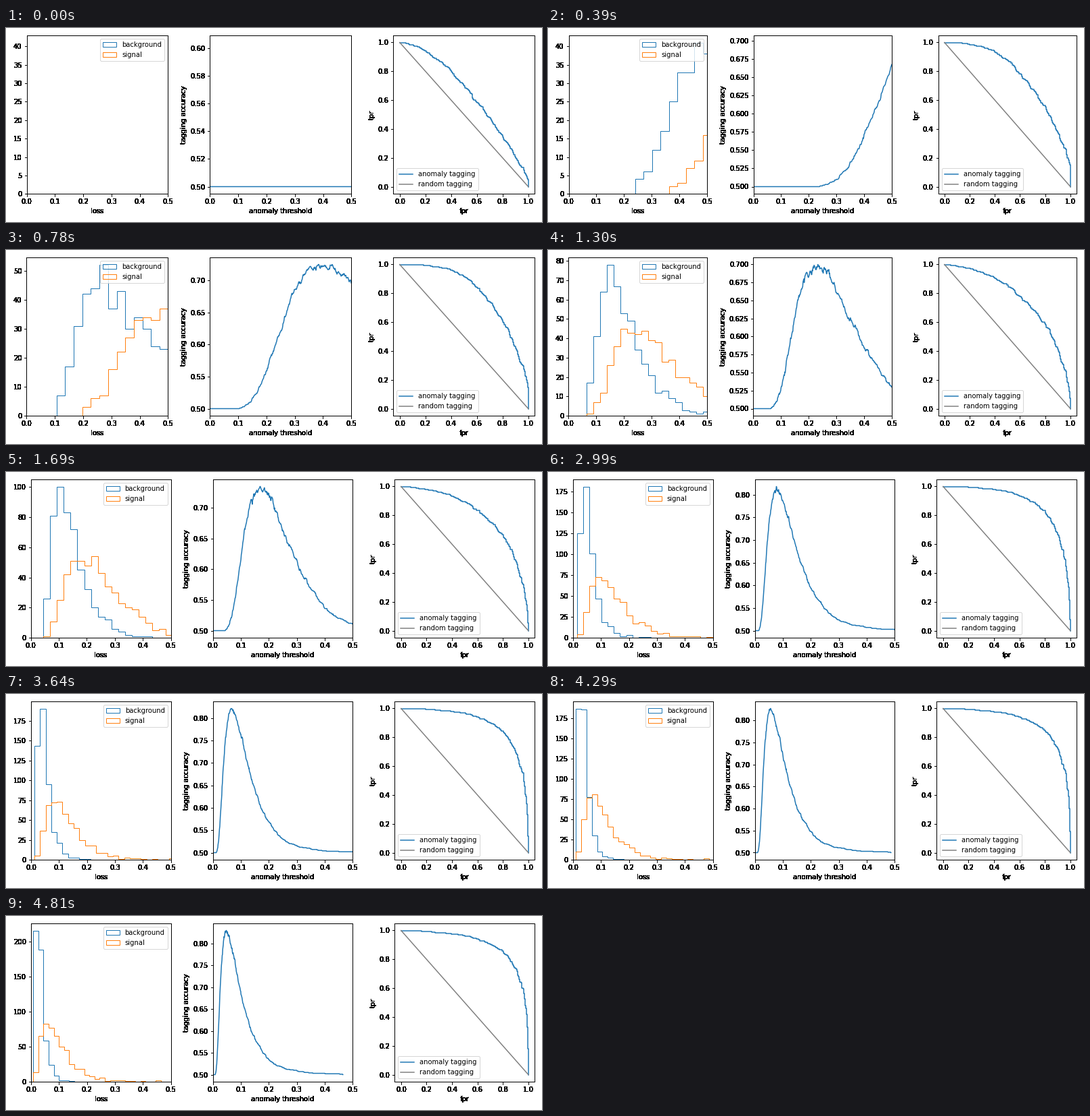
A matplotlib script that plays this animation: 792x288 px, repeating every 4940 ms.

```python
import numpy as np
import matplotlib.pyplot as plt
from matplotlib.animation import FuncAnimation
from matplotlib.axes import Axes

W, H, DPI = 792, 288, 72
STEPS, INTERVAL = 38, 130
BINS, SAMPLES = 25, 500

# Key points of training: median loss and its log-normal spread.
KEYS = [0, 6, 10, 17, 23, 28, 37]
BG_MEDIAN = [.9, .331, .181, .081, .0495, .042, .029]
SIG_MEDIAN = [.965, .53, .283, .162, .1275, .111, .084]
BG_SPREAD = [.15, .46, .42, .43, .51, .49, .49]
SIG_SPREAD = [.123, .33, .41, .46, .52, .53, .59]

rng = np.random.default_rng(4)


class InkAxes(Axes):
    """Axes whose outside parts are inked several times."""

    def draw(self, renderer):
        super().draw(renderer)
        lines, texts = list(self.spines.values()), []
        for axis in (self.xaxis, self.yaxis):
            lo, hi = sorted(axis.get_view_interval())
            eps = 1e-6 * (hi - lo)
            ticks = [t for t in axis.get_major_ticks()
                     if lo - eps <= t.get_loc() <= hi + eps]
            lines += [t.tick1line for t in ticks]
            texts += [t.label1 for t in ticks] + [axis.label]
        for artist in lines * 4 + texts * 24:
            artist.draw(renderer)


def normal_scores():
    """Stratified normal deviates, a little jittered."""
    blocks = np.sort(rng.normal(size=SAMPLES * 40)).reshape(SAMPLES, 40)
    z = blocks.mean(axis=1) + rng.normal(0, .05, SAMPLES)
    return np.sort(np.clip(z * 1.01, -2.9, 2.9))


bg_z, sig_z = normal_scores(), normal_scores()


def losses(step):
    """Sorted background and signal losses after some training."""
    def key(values):
        return np.interp(step, KEYS, values)

    def sample(z, median, spread, skew=0):
        # Early in training the upper tail is squeezed.
        squeeze = .113 * np.exp(-max(step - 6, 0) / 4)
        z = (z + skew * z ** 2) / (1 + squeeze * np.maximum(z, 0) ** 2)
        return np.sort(np.exp(key(np.log(median)) + key(spread) * z))

    skew = .05 * min(step / 6, 1)
    return (sample(bg_z, BG_MEDIAN, BG_SPREAD, skew),
            sample(sig_z, SIG_MEDIAN, SIG_SPREAD))


def below(values, cuts):
    return np.searchsorted(values, cuts, side="right") / len(values)


fig = plt.figure(figsize=(W / DPI, H / DPI), dpi=DPI)
axes = [fig.add_subplot(1, 3, i + 1, axes_class=InkAxes) for i in range(3)]


def update(step):
    bg, sig = losses(step)
    both = np.sort(np.concatenate([bg, sig]))
    hist, acc, roc = axes
    for ax in axes:
        ax.clear()

    edges = np.linspace(both[0], both[-1], BINS + 1)
    hist.hist(bg, edges, histtype="step", label="background")
    hist.hist(sig, edges, histtype="step", label="signal")
    hist.set(xlim=(0, .5), xlabel="loss")
    hist.legend(loc="upper right")

    cuts = np.linspace(0, both[-1], 500)
    acc.plot(cuts, .5 + (below(bg, cuts) - below(sig, cuts)) / 2)
    acc.set(xlim=(0, .5), xlabel="anomaly threshold", ylabel="tagging accuracy")

    cuts = np.append(0, both)
    roc.plot(below(bg, cuts), 1 - below(sig, cuts), label="anomaly tagging")
    roc.plot([0, 1], [1, 0], color="gray", label="random tagging")
    roc.set(xlabel="fpr", ylabel="tpr")
    roc.legend(loc="lower left")

    # Start every layout from the same margins.
    fig.subplots_adjust(left=.125, right=.9, bottom=.125, top=.88, wspace=.2)
    fig.tight_layout()
    return axes


anim = FuncAnimation(fig, update, frames=STEPS, interval=INTERVAL,
                     init_func=lambda: axes, repeat=True, repeat_delay=0,
                     blit=False)
plt.show()
```
